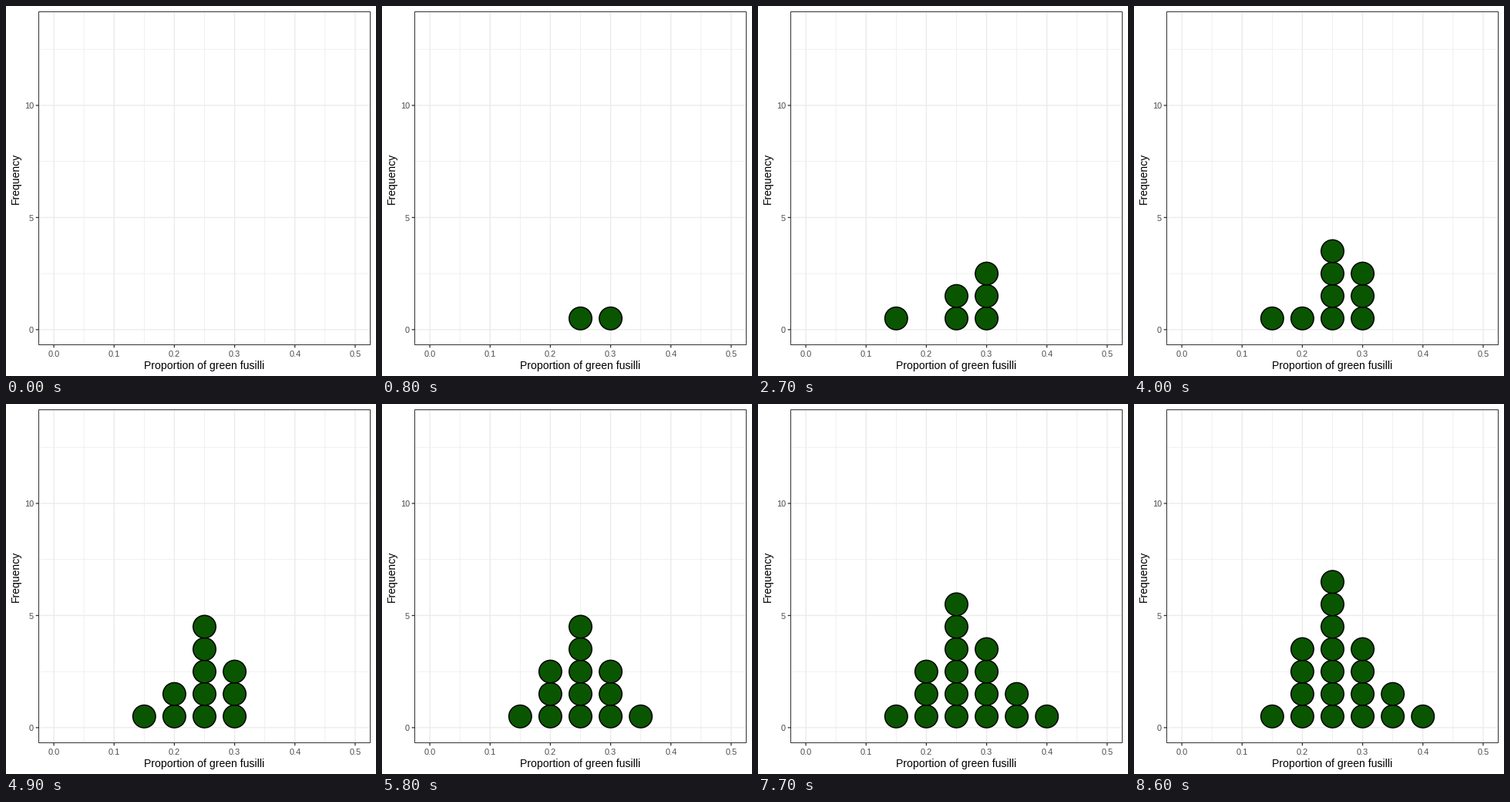
Animation of 480x480 px, one loop 10000 ms. Source, as a matplotlib script:

```python
import matplotlib.pyplot as plt
from matplotlib.animation import FuncAnimation
from matplotlib.patches import Circle, Rectangle

plt.rcParams["font.family"] = "Liberation Sans"

SIZE = 480
FRAMES, INTERVAL = 100, 100
LEFT, RIGHT, TOP, BOTTOM = 42.5, 472.5, 7.5, 439.5
START_Y = 14.5  # dots fall from just above the panel

# Column of each dot in twentieths, in order of arrival.
COLUMNS = [6, 5, 5, 6, 3, 6, 5, 5, 4, 5, 4, 4, 7, 5, 6, 7, 8, 4, 5]
SLOW = {5, 16}  # dots with a slightly longer fall


def px(x):
    return LEFT + (x + 0.025) * (RIGHT - LEFT) / 0.55


def py(y):
    return BOTTOM - (y + 0.675) * (BOTTOM - TOP) / 14.85


# 72 dpi makes one point equal to one pixel.
fig = plt.figure(figsize=(SIZE / 72, SIZE / 72), dpi=72, facecolor="white")
ax = fig.add_axes([0, 0, 1, 1])
ax.set_xlim(0, SIZE)
ax.set_ylim(SIZE, 0)
ax.axis("off")


def line(xs, ys, color, width, z):
    ax.plot(xs, ys, color=color, lw=width, zorder=z, snap=False,
            solid_capstyle="butt")


def label(x, y, s, size, color, ha="center", rotation=0):
    ax.text(x, y, s, size=size, color=color, ha=ha, va="baseline",
            rotation=rotation, rotation_mode="anchor")


def grid_x(x, width, z):
    line([px(x)] * 2, [TOP, BOTTOM], "#ebebeb", width, z)


def grid_y(y, width, z):
    line([LEFT, RIGHT], [py(y)] * 2, "#ebebeb", width, z)


for i in range(5):
    grid_x(0.05 + i / 10, 0.7, 1)
for y in (2.5, 7.5, 12.5):
    grid_y(y, 0.7, 1)

for i in range(6):
    x = i / 10
    grid_x(x, 1.35, 2)
    line([px(x)] * 2, [BOTTOM, BOTTOM + 3.8], "#333333", 1.3, 2)
    label(px(x), 455, f"{x:.1f}", 11, "#4d4d4d")
for y in (0, 5, 10):
    grid_y(y, 1.35, 2)
    line([LEFT - 3.8, LEFT], [py(y)] * 2, "#333333", 1.3, 2)
    label(36, py(y) + 4.3, str(y), 11, "#4d4d4d", ha="right")

ax.add_patch(Rectangle((LEFT, TOP), RIGHT - LEFT, BOTTOM - TOP, fill=False,
                       ec="#333333", lw=1, zorder=50, snap=False))
label(257.5, 471, "Proportion of green fusilli", 14, "black")
label(17, 223.5, "Frequency", 14, "black", rotation=90)


def make_drops():
    """Return (dot, final height, start, length), timed in half frames."""
    drops, counts, end = [], {}, -2
    for k, col in enumerate(COLUMNS):
        length = 10 if k in SLOW else 8
        start = end if k in SLOW else end + 1
        end = start + length
        height = counts.get(col, 0) + 0.5
        counts[col] = counts.get(col, 0) + 1
        dot = Circle((px(col / 20), py(START_Y)), 14.75, fc="#0a5600",
                     ec="black", lw=1.5, zorder=10 + k, visible=False)
        ax.add_patch(dot)
        drops.append((dot, height, start, length))
    return drops


drops = make_drops()


def draw(frame):
    for dot, height, start, length in drops:
        t = min((2 * frame - start) / length, 1)
        # A dot shows only in the second half of its cubic fall.
        dot.set_visible(t >= 0.5)
        if t >= 0.5:
            y = START_Y + (height - START_Y) * t ** 3
            dot.center = (dot.center[0], py(y))
    return [d[0] for d in drops]


anim = FuncAnimation(fig, draw, frames=FRAMES, interval=INTERVAL,
                     init_func=lambda: draw(0), repeat=True, repeat_delay=0)
plt.show()
```
